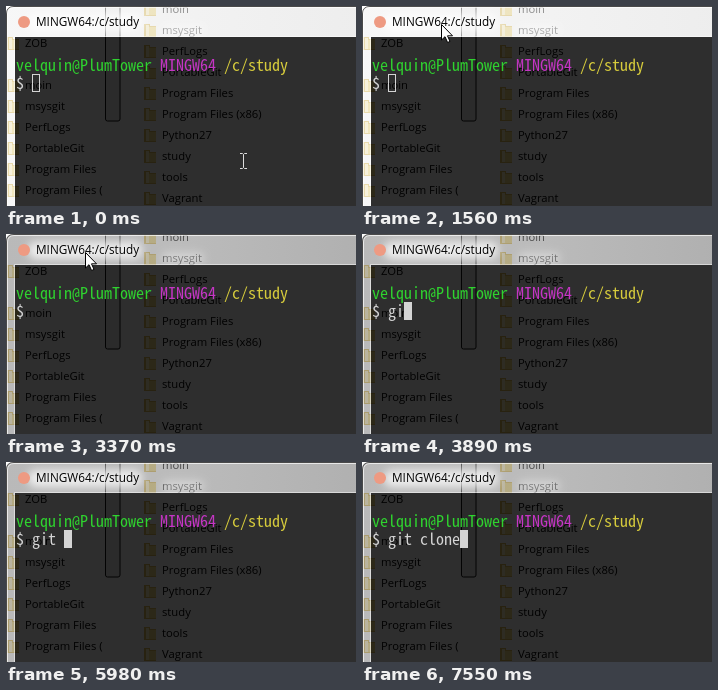
Recreate the animation shown at these times as an HTML page. Size 350 px wide and 200 px high, loop 8000 ms.

```html
<!DOCTYPE html>
<html lang="en">
<head>
<meta charset="utf-8">
<style>
  html, body { margin: 0; width: 100%; height: 100%; overflow: hidden; background: #fff; }
  svg { display: block; width: 350px; height: 200px; }
  .label { font: 11.25px "Open Sans", "Noto Sans", sans-serif; }
  .title { font: 11.75px "Open Sans", "Noto Sans", sans-serif; }
  .term { font: 16px "Noto Sans Mono CJK JP", "Noto Sans Mono", monospace; white-space: pre; }
</style>
</head>
<body>
<svg viewBox="0 0 350 200">
  <defs>
    <filter id="blur" x="-5%" y="-5%" width="110%" height="110%"><feGaussianBlur stdDeviation=".6"/></filter>
    <filter id="soft" x="-30%" y="-80%" width="160%" height="260%"><feGaussianBlur stdDeviation="4"/></filter>
    <linearGradient id="idle" x2="1" y2="0">
      <stop offset="0" stop-color="#f0f0f0" stop-opacity=".55"/>
      <stop offset="1" stop-color="#e4e4e4" stop-opacity=".65"/>
    </linearGradient>
    <linearGradient id="busy" x2="1" y2="0">
      <stop offset="0" stop-color="#808080" stop-opacity=".55"/>
      <stop offset=".5" stop-color="#848484" stop-opacity=".55"/>
      <stop offset="1" stop-color="#707070" stop-opacity=".55"/>
    </linearGradient>
    <clipPath id="pane"><path d="M9 31H350V200H9z"/></clipPath>
    <g id="desk">
      <path d="M0 0H350V200H0z" fill="#fff"/>
      <rect x="99.5" y="-20" width="14.5" height="135" rx="2" fill="#f2f2f2" stroke="#111"/>
      <g id="folders" class="label"></g>
    </g>
  </defs>

  <use href="#desk" filter="url(#blur)"/>
  <path id="glass" d="M0 200V7Q0 0 7 0H350V200z"/>
  <path d="M.5 200V8Q.5 .5 8 .5H350" fill="none" stroke="#4a4a4a"/>
  <path d="M1.5 200V8Q1.5 1.5 8 1.5H350" fill="none" stroke="#fff" stroke-opacity=".7"/>
  <path d="M8.5 200V30.5H350" fill="none" stroke="#fff" stroke-opacity=".5"/>
  <g fill="#fff" filter="url(#soft)">
    <rect x="22" y="8" width="114" height="17" rx="8" opacity=".75"/>
    <rect x="156" y="19" width="42" height="10" rx="5" opacity=".4"/>
  </g>
  <circle cx="18" cy="16" r="6" fill="#ee9a82"/>
  <text class="title" x="30" y="20">MINGW64:/c/study</text>

  <g clip-path="url(#pane)">
    <use href="#desk"/>
    <path d="M9 31H350V200H9z" opacity=".82"/>
  </g>

  <g class="term">
    <text x="10" y="65"><tspan fill="#2fd32f">velquin@PlumTower</tspan><tspan fill="#c535c5"> MINGW64</tspan><tspan fill="#d6cb3c"> /c/study</tspan></text>
    <text id="line" x="10" y="83" fill="#d4d4d4"></text>
  </g>
  <rect id="caret" y="68.5" width="7" height="17"/>
  <path id="beam" d="M0 .5H2.5L3.5 1.5 4.5 .5H7M3.5 1.5V14.5M0 15.5H2.5L3.5 14.5 4.5 15.5H7" fill="none" stroke="#ddd"/>
  <path id="arrow" d="M.5 .5V16L4 12.7 6.6 18.5 9 17.4 6.5 11.8H11.5z" fill="#fff" stroke="#000"/>
</svg>
<script>
const $ = id => document.getElementById(id);
const LOOP = 8000, FOCUS = 1830, HIDE = 3640;
const COMMAND = "git clone";
const keys = [3640, 3890, 4420, 4690, 6530, 6780, 7030, 7300, 7550];
const blinks = [[2360, 2860], [3370, 3640], [4690, 4940], [5450, 5980]];
// Pointer stops: start time, left, top
const stops = [[0, 234, 147], [250, 119, 135], [520, 50, 112], [790, 43, 90],
  [1040, 45, 69], [1290, 71, 26], [1560, 79, 18]];

const names = ["moin", "msysgit", "PerfLogs", "PortableGit", "Program Files",
  "Program Files (x86)", "Python27", "study", "tools", "Vagrant"];

function folder(x, y, name) {
  return `<path d="M${x} ${y - 6}h6v2h6v11h-12z" fill="#e0bf58"/>
    <path d="M${x + 2} ${y - 5}h3v11h-3z" fill="#fff3c4"/>
    <path d="M${x + 5} ${y - 3}h7v9h-7z" fill="#f3dc83"/>
    <text x="${x + 18}" y="${y + 4}">${name}</text>`;
}

$("folders").innerHTML =
  names.map((name, i) => folder(138, 3 + 21 * i, name)).join("") +
  folder(1, 37, "ZOB") +
  names.slice(0, 6).map((name, i) => folder(1, 79 + 21 * i, name.replace("x86)", ""))).join("");

function draw(t) {
  const focused = t >= FOCUS;
  $("glass").setAttribute("fill", focused ? "url(#busy)" : "url(#idle)");

  const typed = keys.filter(k => k <= t).length;
  $("line").textContent = "$ " + COMMAND.slice(0, typed);

  const caret = $("caret");
  const off = blinks.some(([from, to]) => t >= from && t < to);
  caret.setAttribute("x", 26.5 + 8 * typed);
  caret.setAttribute("fill", focused ? "#d4d4d4" : "none");
  caret.setAttribute("stroke", "#d4d4d4");
  caret.style.display = off ? "none" : "";

  const [since, x, y] = stops.findLast(s => s[0] <= t);
  const onTitle = since >= 1290;
  for (const id of ["beam", "arrow"]) $(id).setAttribute("transform", `translate(${x} ${y})`);
  $("beam").style.display = onTitle ? "none" : "";
  $("arrow").style.display = onTitle && t < HIDE ? "" : "none";
}

const start = performance.now();
function tick() {
  draw((performance.now() - start) % LOOP);
  requestAnimationFrame(tick);
}
tick();
</script>
</body>
</html>
```
